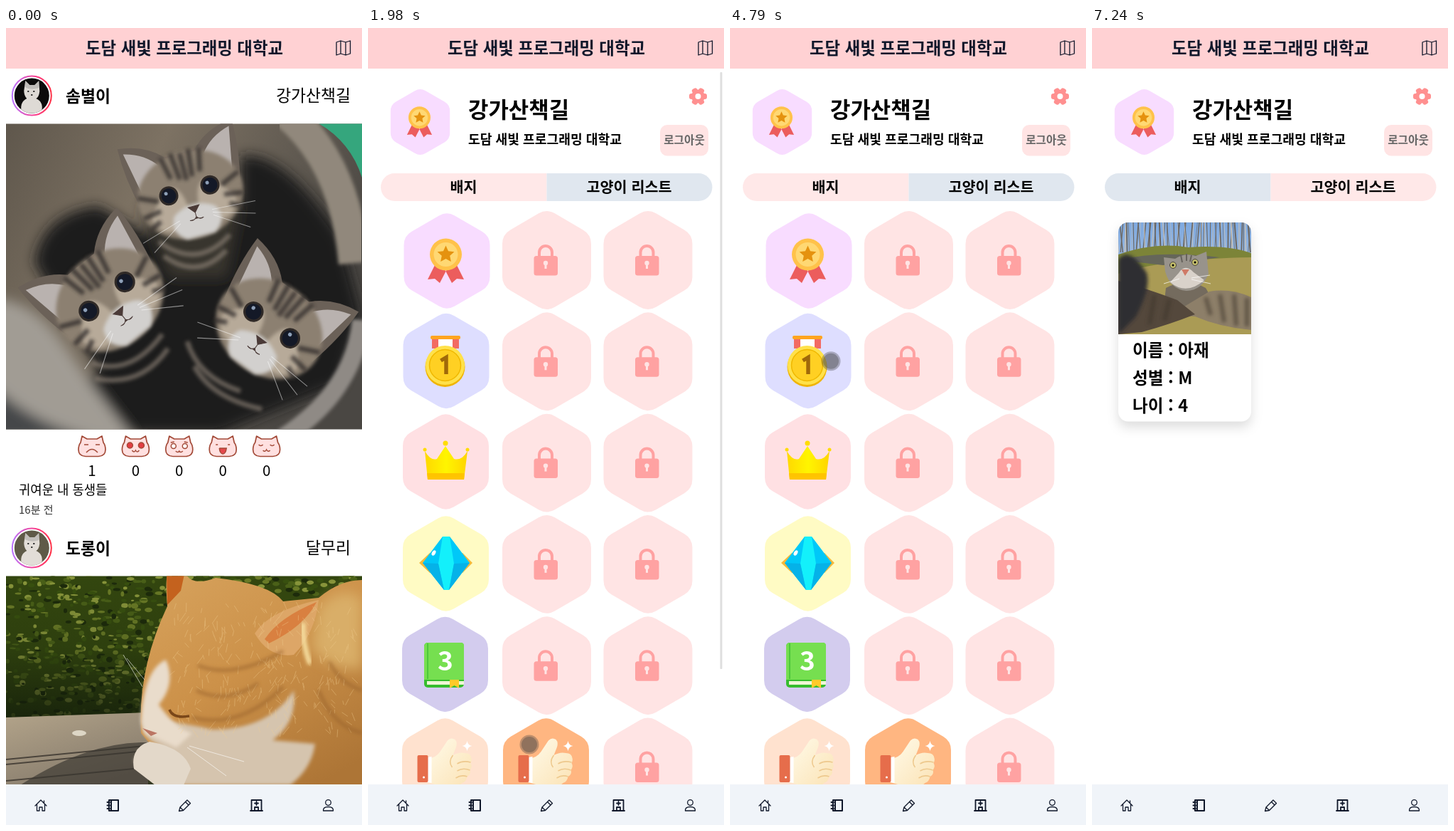
An HTML page that plays this animation: 501x1119 px, repeating every 7340 ms.

```html
<!DOCTYPE html>
<html lang="ko">
<head>
<meta charset="utf-8">
<style>
html, body { margin: 0; width: 100%; height: 100%; overflow: hidden; background: #fff }
body > svg { display: block; width: 501px; height: 1119px }
text { font-family: "Noto Sans CJK KR", "Noto Sans CJK", "Noto Sans", sans-serif; font-weight: 700 }
.light { font-weight: 300 }
.mid { text-anchor: middle }
.line { fill: none; stroke: #0f172a; stroke-width: 1.3; stroke-linejoin: round; stroke-linecap: round }
.hex { fill: currentColor; stroke: currentColor; stroke-width: 44; stroke-linejoin: round }
#card { filter: drop-shadow(0 8px 8px #0002) }
</style>
</head>
<body>
<svg viewBox="0 0 501 1119">
<defs>
  <linearGradient id="ring"><stop stop-color="#b973ff"/><stop offset=".6" stop-color="#fb3f8c"/><stop offset="1" stop-color="#ff3045"/></linearGradient>
  <linearGradient id="room" x2="1" y2=".4"><stop stop-color="#5f574c"/><stop offset=".4" stop-color="#7d7263"/><stop offset="1" stop-color="#4a4743"/></linearGradient>
  <linearGradient id="fur" x1=".2" x2=".8" y2="1"><stop stop-color="#d5a05a"/><stop offset=".45" stop-color="#cc9149"/><stop offset="1" stop-color="#ad7536"/></linearGradient>
  <linearGradient id="wood" x2=".6" y2="1"><stop stop-color="#b3a48a"/><stop offset="1" stop-color="#857a6b"/></linearGradient>
  <linearGradient id="shade" x2="0" y2="1"><stop stop-color="#10190a" stop-opacity="0"/><stop offset=".5" stop-color="#10190a" stop-opacity=".15"/><stop offset="1" stop-color="#10190a" stop-opacity=".75"/></linearGradient>
  <linearGradient id="gold"><stop stop-color="#ffd800"/><stop offset=".5" stop-color="#fff500"/><stop offset="1" stop-color="#ffd400"/></linearGradient>
  <linearGradient id="hand" x2="1" y2="1"><stop stop-color="#fffbea"/><stop offset="1" stop-color="#fbe2b4"/></linearGradient>
  <linearGradient id="sky" x2="0" y2="1"><stop stop-color="#7ea9e0"/><stop offset="1" stop-color="#c9d3dd"/></linearGradient>
  <filter id="soft"><feGaussianBlur stdDeviation="2.5"/></filter>
  <filter id="softer" x="-30%" y="-30%" width="160%" height="160%"><feGaussianBlur stdDeviation="9"/></filter>
  <clipPath id="disc"><circle r="24.5"/></clipPath>
  <clipPath id="top"><path d="M37 430V287a14 14 0 0 1 14-14H210a14 14 0 0 1 14 14V430z"/></clipPath>

  <polygon id="hex" class="hex" points="0,-44.5 38.5,-22.2 38.5,22.2 0,44.5 -38.5,22.2 -38.5,-22.2"/>

  <g id="kitten">
    <path d="M-72 8Q-84-40-83-82Q-45-78-22-54L22-54Q45-78 83-82Q84-40 72 8z" fill="#6b6158"/>
    <path d="M-66-14L-77-73Q-48-66-32-44zM66-14L77-73Q48-66 32-44z" fill="#b9b2af"/>
    <ellipse cy="6" rx="75" ry="62" fill="#8c8071" filter="url(#soft)"/>
    <path d="M-40-3Q-12-25-7 25L-22 50Q-55 55-62 25zM40-3Q12-25 7 25L22 50Q55 55 62 25z" fill="#b7aa99" filter="url(#soft)"/>
    <path d="M-30 30Q0 10 30 30Q42 52 20 66H-20Q-42 52-30 30" fill="#d2d0ce" filter="url(#soft)"/>
    <path d="M0-15V-54M-9-18L-13-57M9-18L13-57M-21-22L-28-54M21-22L28-54M-46 4L-73-8M46 4L73-8M-46 18L-72 22M46 18L72 22M-50 32L-66 40M50 32L66 40" fill="none" stroke="#2c2825" stroke-width="6.500" opacity=".75" filter="url(#soft)"/>
    <g fill="#141927" stroke="#302a27" stroke-width="3"><circle cx="-30" r="12"/><circle cx="30" r="12"/></g>
    <g fill="#8ea0b8"><circle cx="-33" cy="-4" r="2.500"/><circle cx="27" cy="-4" r="2.500"/></g>
    <path d="M-8 23H8L0 32zM0 32v6m-10 3Q-4 44 0 38Q4 44 10 41" fill="#4a3a37" stroke="#4a3a37"/>
    <path d="M-24 38L-82 55M-24 42L-70 72M24 38L82 55M24 42L70 72M24 34L86 38" stroke="#fff" opacity=".5"/>
  </g>

  <g id="medal">
    <use href="#hex" color="#f8dcff"/>
    <path d="M-16 4L-27 26L-17 25L-10 31L1 10zM13 4L24 26L14 25L7 31L-4 10z" fill="#ec5d5d"/>
    <circle cx="-1.500" cy="-9" r="22.500" fill="#ffc24a"/><circle cx="-1.500" cy="-9" r="17" fill="#ffd873"/>
    <path id="star" fill="#e5920f"/>
  </g>
  <g id="thumb">
    <use href="#hex"/>
    <path d="M-25-10Q-13-11-7-20L3-35Q8-41 14-37Q18-33 15-25L11-15Q20-20 28-18Q36-18 37-11Q38-7 36-4Q39 1 35 6Q37 12 31 15Q30 22 24 24Q15 33 2 31Q-10 27-25 23z" fill="url(#hand)"/>
    <path d="M36-5Q25-8 17-3M35 6Q25 2 17 7M31 15Q23 12 15 17M11-15Q4-6 10 2" stroke="#eec98e" fill="none" stroke-width="1.500"/>
    <path d="M-25-12L-19-13V24L-25 23z" fill="#fff"/>
    <rect x="-39" y="-15" width="15" height="38" rx="2" fill="#e66d4b"/>
    <circle cx="-30" cy="16" r="1.500" fill="#fff"/>
    <path d="M31-35Q32-29 38-28Q32-27 31-21Q30-27 24-28Q30-29 31-35" fill="#fff"/>
  </g>
  <g id="lock">
    <use href="#hex" transform="scale(1.033)" color="#ffe4e4"/>
    <path d="M-10.500-5V-11a9 9 0 0 1 18 0V-5" fill="none" stroke="#ffa2a2" stroke-width="4"/>
    <rect x="-18" y="-6" width="33.500" height="27.500" rx="3.500" fill="#ffa2a2"/>
    <path d="M-1.500 5v7" stroke="#ffe4e4" stroke-width="3"/><circle cx="-1.500" cy="4" r="3.200" fill="#ffe4e4"/>
  </g>
  <path id="face" d="M-16-6L-14-15L-7-11H7L14-15L16-6Q19-2 19 4Q19 13 9 13.500H-9Q-19 13-19 4Q-19-2-16-6z" fill="#ffe0e0" stroke-width="1.700" stroke-linejoin="round"/>
</defs>

<g id="feed">
  <g id="posts"></g>
  <svg y="134.500" width="501" height="429" viewBox="0 134.500 501 429">
    <rect y="134" width="501" height="430" fill="url(#room)"/>
    <g filter="url(#softer)">
      <path d="M330 180Q390 170 470 290L500 400L470 500L300 570L60 570L130 480L40 330Q50 260 130 250L200 290L330 250z" fill="#1b1b1f"/>
      <path d="M-20 380Q30 380 70 430L120 500L190 590H-20z" fill="#a19c94"/>
      <path d="M-20 500Q40 560 140 580H-20z" fill="#45464a"/>
      <path d="M190 250H330L310 350H230z" fill="#39342f"/>
    </g>
    <path d="M395 120Q478 190 490 330" fill="none" stroke="#91887b" stroke-width="44" filter="url(#soft)"/>
    <path d="M500 410Q490 510 390 575" fill="none" stroke="#8f8a85" stroke-width="26" filter="url(#soft)"/>
    <path d="M440 134H501V210Q485 160 440 134" fill="#35a67d"/>
    <path d="M215 300Q270 340 315 290M222 320Q270 355 310 312M120 470Q175 490 220 430M125 492Q190 505 228 450M255 440Q270 490 330 510M265 475Q290 520 360 535" fill="none" stroke="#8b8075" stroke-width="7" opacity=".65" filter="url(#soft)"/>
    <use href="#kitten" transform="translate(258 228) rotate(-15)"/>
    <use href="#kitten" transform="translate(142 377) rotate(-39) scale(1.080)"/>
    <use href="#kitten" transform="translate(374 417) rotate(36) scale(1.060)"/>
  </svg>
  <g id="faces"></g>
  <text class="light" x="18" y="655" font-size="17.800">귀여운 내 동생들</text>
  <text class="light" x="18" y="682" font-size="15" fill="#333">16분 전</text>
  <svg y="769.500" width="501" height="293" viewBox="0 769.500 501 293">
    <rect y="769" width="501" height="294" fill="#33460f"/>
    <g id="leaves"></g>
    <rect y="769" width="260" height="200" fill="url(#shade)"/>
    <path d="M0 968L200 961V1063H0z" fill="url(#wood)"/>
    <path d="M0 1027L195 1008M0 1034L195 1015M0 1057L180 1040" stroke="#4b443b" stroke-width="2"/>
    <path d="M20 1063Q110 1005 190 1003H260V1063z" fill="#38352f" opacity=".65"/>
    <ellipse cx="103" cy="990" rx="10" ry="4" fill="#ddd6c5"/>
    <path d="M227 812Q223 765 230 765H252Q262 785 295 772Q370 780 390 805L440 800Q470 775 501 775V1063H250L190 990Q185 900 227 812" fill="url(#fur)"/>
    <path d="M440 815Q470 780 501 800V900Q450 900 430 870z" fill="#d9ae68" filter="url(#softer)"/>
    <path d="M227 810L226 767H251L246 790z" fill="#c4621e"/>
    <path d="M350 850Q370 818 440 803Q435 850 405 880Q370 885 350 850" fill="#dda667"/>
    <path d="M364 858Q385 827 437 806Q420 840 370 864z" fill="#d98040"/>
    <path d="M418 835Q417 865 428 893" fill="none" stroke="#f5dd9e" stroke-width="7" filter="url(#soft)"/>
    <path d="M190 970Q250 975 290 985Q370 985 405 930Q410 975 375 1000L435 1005Q430 1040 400 1063H230L180 1030Q185 1010 220 1008Q190 1000 190 970" fill="#d5c4ae" filter="url(#soft)"/>
    <path d="M225 887Q240 920 215 950Q240 985 262 990L240 1010L195 990L190 968Q195 900 225 887" fill="#e9dccb" filter="url(#soft)"/>
    <path d="M180 1040Q175 1010 202 1002Q250 1010 260 1040L250 1063H210z" fill="#e3d8c9"/>
    <g id="fluff" fill="none" stroke="#f0cd90" opacity=".4"></g>
    <path d="M268 930Q310 950 355 920M262 968Q330 985 390 925M270 895Q320 915 390 875M440 930Q460 980 501 990M455 890Q470 920 501 930" fill="none" stroke="#96602a" stroke-width="5" opacity=".55" filter="url(#soft)"/>
    <path d="M230 957Q235 970 258 966" fill="none" stroke="#7a4719" stroke-width="3.500"/>
    <path d="M192 983L204 994L213 990" fill="#bb7563"/>
    <path d="M255 1010L310 1050M258 1008L335 1030M192 925L165 880M195 915L170 885" stroke="#fff" opacity=".6"/>
  </svg>
</g>

<g id="profile">
  <use id="medalPic" href="#medal" transform="translate(73.500 132) scale(.690)"/>
  <use id="thumbPic" href="#thumb" color="#ffb681" transform="translate(71.500 130.500) scale(.690)"/>
  <text x="141" y="126" font-size="30.900">강가산책길</text>
  <text x="141" y="163" font-size="18.200">도담 새빛 프로그래밍 대학교</text>
  <g id="gear" fill="#ff9090" transform="translate(464.500 96)"></g>
  <rect x="411" y="136" width="68" height="43.500" rx="10" fill="#ffe4e4"/>
  <text class="mid" x="445" y="163" font-size="15.700" fill="#666">로그아웃</text>
  <path id="tabL" d="M251.500 204V243H37.500a19.500 19.500 0 0 1 0-39z"/>
  <path id="tabR" d="M251.500 204V243H465a19.500 19.500 0 0 0 0-39z"/>
  <text class="mid" x="134.500" y="231" font-size="20.700">배지</text>
  <text class="mid" x="367.500" y="231" font-size="20.700">고양이 리스트</text>

  <g id="badges">
    <g id="locks"></g>
    <use href="#medal" x="111" y="327"/>
    <use href="#hex" x="110" y="467.500" color="#dedeff"/>
    <path d="M90 434H128V450H90z" fill="#f26b63"/><path d="M99 434H119V450H99z" fill="#fff"/>
    <rect x="88" y="432" width="42" height="5" rx="2" fill="#ffa51f"/>
    <circle cx="108.500" cy="476" r="28" fill="#f0b400"/><circle cx="108.500" cy="473.500" r="27.500" fill="#ffe14a"/>
    <circle cx="108.500" cy="473.500" r="22" fill="#ffd023" stroke="#f0b800" stroke-width="1.500"/>
    <path d="M102.500 467L110 462.500V486" fill="none" stroke="#a0690a" stroke-width="5.500"/>
    <use href="#hex" x="109.500" y="609" color="#ffe0e3"/>
    <path d="M84 634L80 594Q88 608 97 605L109 587L121 605Q132 608 140 594L135 634z" fill="url(#gold)"/>
    <path d="M83 625H136L135 634H84z" fill="#ffc400"/>
    <g fill="#ffdc00"><circle cx="80" cy="592" r="2.500"/><circle cx="109" cy="583" r="3.500"/><circle cx="140" cy="592" r="2.500"/></g>
    <use href="#hex" x="109.500" y="752" color="#fffbc4"/>
    <path d="M72 751L87 737H133L147 751L133 765H87z" fill="#f6b93b"/>
    <path d="M105 714H115L143 751L114 789H107L77 751z" fill="#00c8f8"/>
    <path d="M105 714H115L121 752L114 789H107L99 752z" fill="#13f0fb"/>
    <path d="M121 752L143 751L114 789zM99 752L77 751L107 789z" fill="#05b2e8"/>
    <ellipse cx="92.500" cy="737" rx="2.500" ry="4" fill="#fff" transform="rotate(30 92.500 737)"/>
    <use href="#hex" x="108.500" y="893.500" color="#d3ccee"/>
    <rect x="79" y="863" width="56" height="63" rx="5" fill="#35bd2d"/>
    <path d="M84 863H131a4 4 0 0 1 4 4V915H79V868a5 5 0 0 1 5-5z" fill="#76df50"/>
    <path d="M83 917H135V922H83z" fill="#eef6d5"/><path d="M84 864V914" stroke="#4dc73b" stroke-width="2"/>
    <path d="M115 915H128V927L121.500 923L115 927z" fill="#ffca28"/>
    <text class="mid" x="109" y="902" font-size="37" fill="#fff">3</text>
    <use href="#thumb" x="108.500" y="1036" color="#ffe2cf"/>
    <use href="#thumb" x="250.500" y="1036" color="#ffb681"/>
  </g>

  <g id="card">
    <rect x="37" y="273" width="187" height="279.500" rx="14" fill="#fff"/>
    <g clip-path="url(#top)">
      <rect x="37" y="273" width="187" height="157" fill="url(#sky)"/>
      <g id="trees"></g>
      <path d="M37 318Q90 300 135 308Q190 304 224 316V430H37z" fill="#7c8438"/>
      <path d="M37 345Q100 324 224 322V430H37z" fill="#aa9b55"/>
      <path d="M40 326Q90 312 180 322L100 333z" fill="#65665a"/>
      <path d="M104 365Q132 350 160 365L180 400H100z" fill="#746b5e"/>
      <path d="M110 403L165 370Q195 365 224 378V424Q180 420 145 405z" fill="#8d7f69"/>
      <path d="M37 355Q75 365 120 382L145 402Q110 416 70 427L37 430z" fill="#54483c"/>
      <path d="M37 325Q52 305 77 344Q83 365 62 405L37 430z" fill="#2e2e33" filter="url(#soft)"/>
      <path d="M160 378L167 403M180 374L186 413M200 374L203 418M218 379V419M88 375L81 416M109 381L102 411" stroke="#3d342b" stroke-width="6" opacity=".55" filter="url(#soft)"/>
      <path d="M103 342L101 322L117 324Q130 315 146 320L161 314L164 345Q155 368 133 369Q110 367 103 342" fill="#98938b"/>
      <path d="M122 344Q131 330 143 343L158 354Q133 376 110 357z" fill="#d9d2ca"/>
      <g fill="#c3bd6c" stroke="#4a4740"><circle cx="114" cy="333" r="4.500"/><circle cx="145" cy="329" r="4.500"/></g>
      <circle cx="114" cy="333" r="1.500"/><circle cx="145" cy="329" r="1.500"/>
      <path d="M126 339H137L131 348z" fill="#cf7a66"/>
      <path d="M125 319L127 329M133 317V327M140 319L138 328" stroke="#66625c" stroke-width="2"/>
      <path d="M140 351L166 347M140 353L167 359M123 352L101 359" stroke="#fff" opacity=".7"/>
    </g>
    <g font-size="23.600"><text x="57" y="461">이름 : 아재</text><text x="57" y="500">성별 : M</text><text x="57" y="539">나이 : 4</text></g>
  </g>
  <rect id="bar" x="495.500" y="62" width="3" height="838" rx="1"/>
</g>

<rect width="501" height="57" fill="#ffd1d3"/>
<text class="mid" x="251" y="37" font-size="23.400" fill="#0f172a">도담 새빛 프로그래밍 대학교</text>
<path class="line" d="M465 20L471 18L478 20L484.500 18V36L478 38L471 36L465 38zM471 18V36M478 20V38"/>
<rect y="1062" width="501" height="57" fill="#f0f4f9"/>
<g class="line">
  <path d="M41 1092L49 1084L57 1092M43.500 1090V1099H47V1094H51V1099H54.500V1090M53.500 1088V1085"/>
  <path d="M145 1084H158V1099H145zM148 1084V1099M142.500 1087H146M142.500 1091.500H146M142.500 1096H146" stroke-width="2"/>
  <path d="M243.500 1099.500L245 1094L255 1084L259.500 1088.500L249.500 1098.500zM252.500 1086.500L257 1091M245 1094L249.500 1098.500"/>
  <path d="M345.500 1099V1084H359.500V1099M344 1099H361M350 1099V1094H355V1099M352.500 1086V1091M350 1088.500H355" stroke-width="1.800"/>
  <circle cx="453.500" cy="1087.500" r="3.800"/><path d="M446.500 1099Q446 1093.500 453.500 1093.500Q461 1093.500 460.500 1099z"/>
</g>
<g id="cursor" fill="#444"><circle r="13.500" opacity=".35"/><circle id="core" r="11" opacity=".38"/></g>
</svg>

<script>
const LOOP = 7340;
const $ = id => document.getElementById(id);
const repeat = (n, fn) => Array.from({ length: n }, (_, i) => fn(i)).join('');
let seed = 7;
const rnd = (lo, hi) => {
  seed = (seed * 16807) % 2147483647;
  return +(lo + (hi - lo) * seed / 2147483647).toFixed(1);
};

const post = (y, name, user, back, coat) => `
  <g transform="translate(36.3 ${y})"><circle r="27.5" fill="#fff" stroke="url(#ring)" stroke-width="2"/>
    <g clip-path="url(#disc)"><rect x="-25" y="-25" width="50" height="50" fill="${back}"/>
      <path d="M-11-7L-9-21L-3-15H4L10-21L11-6Q10 2 6 4Q18 9 13 25H-14Q-18 9-7 4Q-11 0-11-7" fill="${coat}"/>
      <path d="M-9-21L-3-15H4L10-21V-11Q0-7-10-12z" fill="#888" opacity=".35"/>
      <path d="M-6-6h2m6 0h2m-5 5h2" stroke="#222" stroke-width="2"/></g></g>
  <text x="84" y="${y + 9}" font-size="22.8">${name}</text>
  <text class="light" x="485" y="${y + 8}" font-size="22.8" text-anchor="end">${user}</text>`;
$('posts').innerHTML = post(95, '솜별이', '강가산책길', '#0c0b0b', '#dedad5')
  + post(730, '도롱이', '달무리', '#5f5a48', '#e2ddd7');

const moods = [
  '<path d="M-11-3h6M5-3h6M-8 8Q0-1 8 8" fill="none"/>',
  '<g fill="#e33d43"><circle cx="-8" cy="-2" r="4"/><circle cx="8" cy="-2" r="4"/></g><path d="M-5 5Q-2 9 0 5Q2 9 5 5" fill="none"/>',
  '<g fill="#fff"><circle cx="-8" cy="-1" r="3.5"/><circle cx="8" cy="-1" r="3.5"/></g><path d="M-12-6l5-1M12-6l-5-1M-5 6Q-2 9 0 6Q2 9 5 6" fill="none"/>',
  '<path d="M-10-3h3M7-3h3M-5 2H5Q4 10 0 10Q-4 10-5 2" fill="#e5484c"/>',
  '<path d="M-11-3q3 3 6 0M5-3q3 3 6 0M-5 5Q-2 8 0 4Q2 8 5 5" fill="none"/>'
];
$('faces').innerHTML = moods.map((mood, i) => {
  const x = 121 + i * 61.4;
  return `<g transform="translate(${x} 588)" stroke="#a34a38" stroke-width="1.5"><use href="#face"/>${mood}</g>
    <text class="light mid" x="${x}" y="629" font-size="20.5">${i ? 0 : 1}</text>`;
}).join('');

const greens = ['#1d2b0b', '#4a6018', '#697a26', '#87943a', '#38500f'];
$('leaves').innerHTML = repeat(750, i =>
  `<ellipse cx="${rnd(0, 300)}" cy="${rnd(765, 966)}" rx="${rnd(2, 6)}" ry="${rnd(1, 4)}" fill="${greens[i % 5]}" transform="rotate(${rnd(-3, 3)})"/>`)
  + repeat(70, i => `<ellipse cx="${rnd(270, 501)}" cy="${rnd(768, 800)}" rx="5" ry="3" fill="${greens[i % 5]}"/>`);
$('fluff').innerHTML = repeat(280, () => {
  const x = rnd(235, 490), y = rnd(805, 985);
  return `<path d="M${x} ${y}l${rnd(-9, 9)} ${rnd(5, 13)}"/>`;
});
$('trees').innerHTML = repeat(60, i => {
  const x = 37 + i * 3.15;
  return `<path d="M${x} 315L${x + rnd(-5, 5)} 270" stroke="${i % 3 ? '#6b655e' : '#c2bfb9'}" stroke-width="${rnd(0.5, 2)}"/>`;
});
$('locks').innerHTML = repeat(11, i =>
  `<use href="#lock" x="${i < 10 && i % 2 === 0 ? 251.5 : 394}" y="${326 + Math.floor(i / 2) * 142.3}"/>`);
$('gear').innerHTML = '<circle r="9.5"/>' + repeat(6, i =>
  `<rect x="-4" y="-12.5" width="8" height="8" rx="3" transform="rotate(${30 + i * 60})"/>`)
  + '<circle r="4" fill="#fff"/>';
$('star').setAttribute('d', 'M' + Array.from({ length: 10 }, (_, i) => {
  const r = i % 2 ? 6 : 12.5, a = i * Math.PI / 5;
  return [(-1.5 + r * Math.sin(a)).toFixed(2), (-9 - r * Math.cos(a)).toFixed(2)];
}).join('L') + 'z');

// Pointer stops: time, x, y
const stops = [
  [20, 453, 1098], [410, 455, 1094], [950, 407, 725], [1140, 385, 705], [1240, 385, 705],
  [1880, 227, 1006], [1980, 227, 1006], [2650, 248, 1024], [2890, 248, 1024],
  [3210, 129, 338], [3930, 129, 338], [4100, 122, 420], [4650, 140, 470], [4750, 140, 470],
  [5480, 364, 217], [6000, 364, 217], [6230, 387, 220], [6960, 387, 220]
];
const presses = [[60, 140], [2720, 2890], [3210, 3590], [5480, 6060]];
const between = (t, [from, to]) => t >= from && t < to;
const show = (id, on) => $(id).setAttribute('display', on ? 'inline' : 'none');

function pointer(t) {
  const i = stops.findIndex((s, k) => k && t < s[0]);
  const [t0, x0, y0] = stops[i - 1], [t1, x1, y1] = stops[i];
  const u = (t - t0) / (t1 - t0), e = u * u * (3 - 2 * u);
  return `translate(${x0 + (x1 - x0) * e} ${y0 + (y1 - y0) * e})`;
}

function draw(t) {
  const onProfile = t >= 100, onCats = t >= 6060;
  const thumb = between(t, [2940, 3930]);
  show('feed', !onProfile);
  show('profile', onProfile);
  show('badges', !onCats);
  show('card', onCats);
  show('thumbPic', thumb);
  show('medalPic', !thumb);
  $('tabL').setAttribute('fill', onCats ? '#e0e7ef' : '#ffe8e8');
  $('tabR').setAttribute('fill', onCats ? '#ffe8e8' : '#e0e7ef');
  $('bar').setAttribute('opacity', Math.max(0, Math.min(0.3, (2770 - t) * 0.000165)));

  const visible = between(t, [20, 6960]);
  show('cursor', visible);
  if (visible) {
    $('cursor').setAttribute('transform', pointer(t));
    $('core').setAttribute('r', presses.some(p => between(t, p)) ? 8.5 : 11);
  }
}

const start = performance.now();
function tick() {
  draw((performance.now() - start) % LOOP);
  requestAnimationFrame(tick);
}
tick();
</script>
</body>
</html>
```
